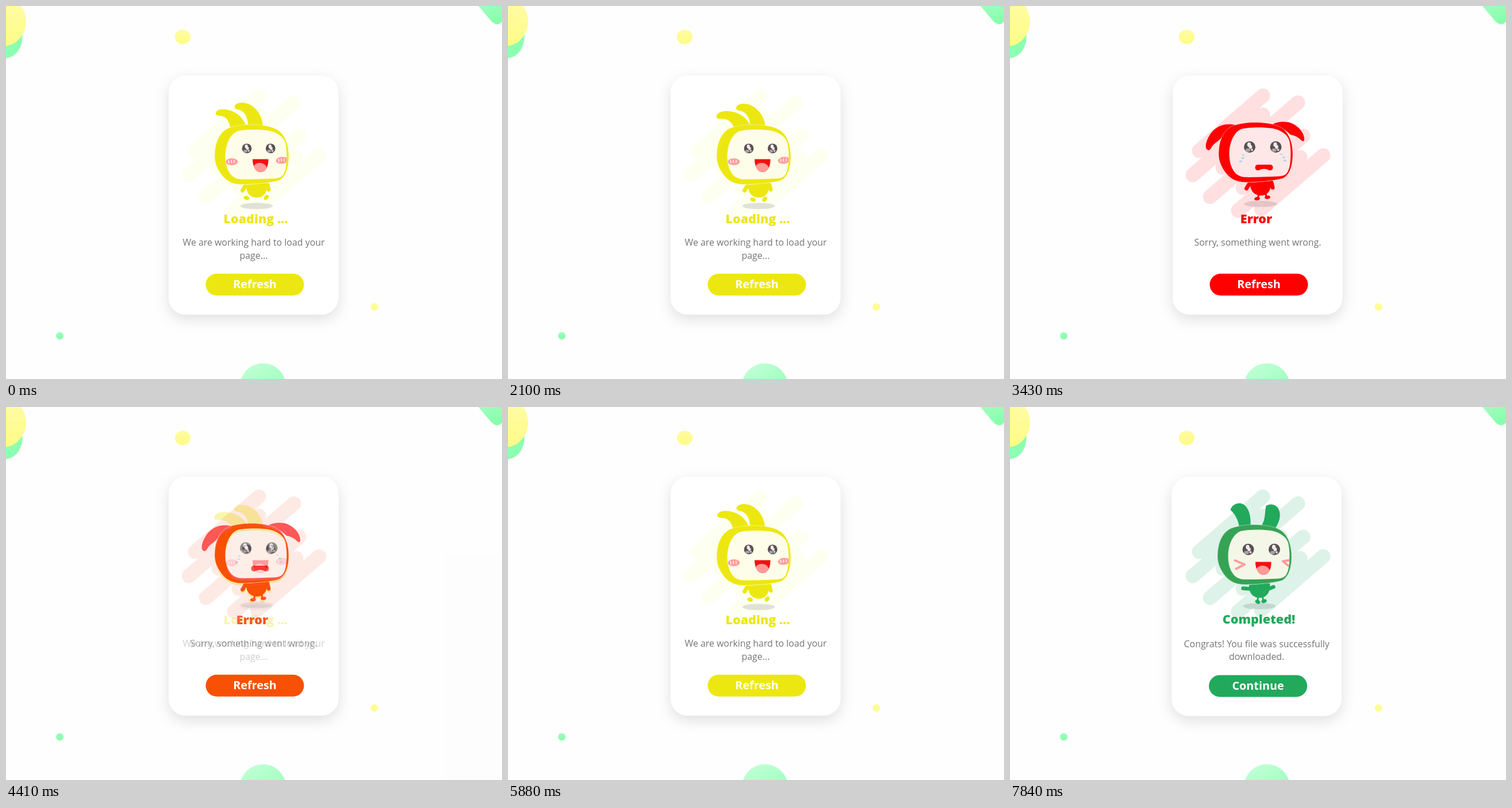
An HTML page for the animation above (9.03 s loop, 863 by 649 pixels).

```html
<!DOCTYPE html>
<html lang="en">
<head>
<meta charset="utf-8">
<title>Loading card</title>
<style>
  html, body { margin: 0; width: 100%; height: 100%; overflow: hidden; background: #fefefe; }
  svg { display: block; width: 863px; height: 649px; }
  text { font-family: "Open Sans", sans-serif; text-anchor: middle; }
  .title { font-size: 21.5px; font-weight: 800; }
  .note { font-size: 15.9px; fill: #757575; }
  .label { font-size: 19.8px; font-weight: 700; fill: #fff; }
  .limb { fill: none; stroke: currentColor; stroke-linecap: round; }
  .whisker { fill: none; stroke: #ff9c9c; stroke-width: 4; stroke-linecap: round; stroke-linejoin: round; }
</style>
</head>
<body>
<svg id="stage" viewBox="0 0 863 649">
  <defs>
    <linearGradient id="sun" x2="0" y2="1"><stop stop-color="#fffca2"/><stop offset="1" stop-color="#fffb86"/></linearGradient>
    <linearGradient id="mint" x2="0.6" y2="1"><stop stop-color="#a2fcc0"/><stop offset="1" stop-color="#86ffab"/></linearGradient>
    <linearGradient id="pale" x2="0.5" y2="1"><stop stop-color="#c8ffda"/><stop offset="1" stop-color="#8effb5"/></linearGradient>
    <filter id="soft" x="-20%" y="-20%" width="140%" height="140%">
      <feDropShadow dx="0" dy="8" stdDeviation="12" flood-color="#000" flood-opacity="0.12"/>
    </filter>
    <path id="head" d="M363 262C363 238 371 219 388 212C402 207 420 205.500 436 206.500C456 208 470 212 478 220C488 230 492 246 492 262C492 280 487 297 476 303C464 308 425 310.500 410 310.500C395 310 385 306 376 295C367 284 363 272 363 262Z"/>
    <path id="face" d="M381.500 262C381.500 242 389 224 402 218C412 214.500 440 214 456 216.500C470 219 483 227 486 238C489 250 489 268 487 280C485 292 481 299 470 300C455 300.500 425 302 408 301.500C390 300 382 283 381.500 262Z"/>
    <path id="mouth" d="M429 266.500H456.500C457 280 451 289 443 289C435 289 429 280 429 266.500Z"/>
    <clipPath id="inFace"><use href="#face"/></clipPath>
    <clipPath id="inMouth"><use href="#mouth"/></clipPath>
    <path id="torso" d="M418 311L454 308C456 322 449 333.500 437 333.500C424 333.500 417 324 418 311Z"/>
    <g id="eye">
      <circle r="10" fill="#575153"/>
      <ellipse cx="-1" cy="-4" rx="3.200" ry="4" fill="#f4e8ea"/>
      <ellipse cx="1.500" cy="0" rx="2.800" ry="3.300" fill="#f4e8ea"/>
      <ellipse cx="-3" cy="5.500" rx="4.200" ry="3" fill="#a9a2a4"/>
      <circle cx="4" cy="5" r="2" fill="#ddd5d7"/>
    </g>
    <g id="smile">
      <use href="#mouth" fill="#f31111"/>
      <ellipse cx="441.500" cy="284" rx="12.500" ry="11" fill="#ff9a98" clip-path="url(#inMouth)"/>
    </g>
    <path id="stripes" fill="none" stroke-width="25" stroke-linecap="round"
      d="M440 156L329 252M440 189L318 294M501 168L370 281M471 226L348 332M510 226L405 316M505 263L397 356M545 260L437 353"/>
    <g id="backdrop">
      <rect width="863" height="649" fill="#fefefe"/>
      <path d="M0 91C18 88 30 72 28.500 48L0 40Z" fill="#8cffb0"/>
      <path d="M0 69.500C19 68 35 48 35 27C35 16 31 6 26 0H0Z" fill="url(#sun)"/>
      <path d="M822 0L844 26Q855 37 863 27V0Z" fill="url(#mint)"/>
      <ellipse cx="307.500" cy="53.700" rx="13.500" ry="12.500" fill="url(#sun)"/>
      <circle cx="641" cy="523.500" r="6.500" fill="url(#sun)"/>
      <circle cx="93.500" cy="574" r="6.500" fill="url(#mint)"/>
      <circle cx="447" cy="661.500" r="40" fill="url(#pale)"/>
    </g>
  </defs>
</svg>
<script>
const LOOP = 9030;
const stage = document.getElementById('stage');

const ellipse = (x, y, rx, ry, turn = 0, fill = 'currentColor') =>
  `<ellipse rx="${rx}" ry="${ry}" fill="${fill}" transform="translate(${x} ${y}) rotate(${turn})"/>`;
const limb = (d, width) => `<path class="limb" d="${d}" stroke-width="${width}"/>`;
const eyes = (x1, x2, y, size) => [x1, x2].map(x =>
  `<use href="#eye" transform="translate(${x} ${y}) scale(${size})"/>`).join('');
const text = (kind, x, y, words) => `<text class="${kind}" x="${x}" y="${y}">${words}</text>`;

// A whole screen: dx, dy place the head and torso, cx, cy the card and its button.
function scene(o) {
  const at = `transform="translate(${o.dx} ${o.dy})"`;
  const [cx, cy] = o.card;
  const notes = o.notes.map((line, i) => text('note', 431 + cx, 417.3 + cy + i * 22.3, line)).join('');
  return `<g id="${o.id}" color="${o.color}">
    <use href="#backdrop"/>
    <rect x="${283 + cx}" y="${121 + cy}" width="295.500" height="416" rx="30" fill="#fff" filter="url(#soft)"/>
    <use href="#stripes" stroke="${o.stripes}"/>
    ${ellipse(436 + o.dx, 348 + o.dy, 28.5, 5.5, 0, 'rgba(0,0,0,.115)')}
    <g fill="currentColor">${o.ears}${o.limbs}<use href="#torso" ${at}/></g>
    <g ${at}>
      <use href="#head" fill="${o.headColor || o.color}" stroke="#fff" stroke-opacity=".6" stroke-width=".7"/>
      <use href="#face" fill="${o.faceColor}"/>
      <g clip-path="url(#inFace)">${o.cheeks || ''}</g>
    </g>
    ${o.features}
    <g fill="currentColor">${text('title', ...o.title)}</g>${notes}
    <rect x="${347.5 + o.button[0]}" y="${465.8 + o.button[1]}" width="171" height="38" rx="19" fill="currentColor"/>
    ${text('label', 433 + o.button[0], 491 + o.button[1], o.label)}
  </g>`;
}

const blush = (x, y, lean) => ellipse(x, y, 10.5, 6, lean, '#ff9f9f') +
  `<path d="M${x - 6} ${y - 2}l1 4m4 -4.500l.500 4m4.500 -4l0 4" fill="none" stroke="#fff" stroke-width="1.300" stroke-linecap="round"/>`;

const loading = scene({
  id: 'loading', color: '#ede711', faceColor: '#fdfde9', stripes: '#fdfff0',
  dx: 0, dy: 0, card: [0, 0], button: [0, 0],
  ears: '<path id="earL"/><path id="earR"/>',
  limbs: limb('M416 314L411.500 321', 7) + limb('M455 311L457 319.500', 7) +
    '<ellipse id="footL" rx="5" ry="3.500"/><ellipse id="footR" rx="5" ry="3.600"/>',
  cheeks: blush(393, 271, 0) + blush(480, 268.5, -6),
  features: eyes(419, 460.3, 247.8, .84) + '<use href="#smile"/>',
  title: [434.5, 377.5, 'Loading ...'],
  notes: ['We are working hard to load your', 'page...'], label: 'Refresh'
});

const tears = [[406, 259.5, 1.8], [405, 264.7, 2.6], [401, 270.3, 3], [472, 258, 1.8], [476.5, 263.3, 2.6], [478.5, 269, 2.8]]
  .map(([x, y, r]) => ellipse(x, y, r, 1.4, x < 440 ? -8 : 8, '#a3d5ec')).join('');

const error = scene({
  id: 'error', color: '#ff0000', faceColor: '#ffe7e8', stripes: '#ffdfe0',
  dx: 0, dy: -3.7, card: [0, 0], button: [0, 0],
  ears: `<path d="M392 207C375 203 359 208 349 222C341 234 339 245 342 249C345 252 348 251 350 247C354 239 362 236 367 230C374 220 380 212 392 207Z"/>
    <path d="M455 207C464 201 480 200 490 204C504 210 512 222 512 232C512 236 509 236 506 233C500 227 494 225 488 224C482 218 476 212 455 207Z"/>`,
  limbs: limb('M416 310L411.500 317.500', 7) + limb('M455 307L457 316', 7) +
    limb('M433 327L431.500 334M445 327L446 332', 3.2) + ellipse(430, 335.3, 5, 3, -8) + ellipse(448, 332.8, 5, 3, -8),
  features: eyes(417, 462.5, 245.2, 1) + tears +
    '<path d="M431 276H453C459 276 459 286 453 286C449 286 448 283.500 442 283.500C436 283.500 435 286 431 286C425 286 425 276 431 276Z" fill="#ff0000"/>',
  title: [428.5, 377.5, 'Error'], notes: ['Sorry, something went wrong.'], label: 'Refresh'
});

const done = scene({
  id: 'done', color: '#22a95c', headColor: '#36a354', faceColor: '#f4f7e7', stripes: '#ddf2e8',
  dx: -2, dy: -1.5, card: [-1.8, .6], button: [-1.4, .6],
  ears: `<path d="M399 209C397 196 392 187 383.500 179C386 171 393 167 400 167.500C411 168.500 420 182 418.500 207Z"/>
    <path d="M437 207C445 197 443 182 445.500 172C451 168 462 168.500 467 177C473 188 468 202 461 212Z"/>`,
  limbs: limb('M420 316.500L405.500 315.500', 6.5) + limb('M446 318L458.500 313', 6.5) +
    limb('M431.500 329L431 337M439 328L440.500 336', 3) + ellipse(431, 339, 4.6, 3.2, 25) + ellipse(442, 337.8, 4.8, 3.2, -15),
  cheeks: '<path class="whisker" d="M393.500 268.500L410 275.500L395.500 283M488 268L477 270L486 277.500"/>',
  features: eyes(414.5, 460, 247.7, 1) + '<use href="#smile" x="-2" y="3"/>',
  title: [433, 376.5, 'Completed!'],
  notes: ['Congrats! You file was successfully', 'downloaded.'], label: 'Continue'
});

stage.insertAdjacentHTML('beforeend', loading + error + done);
const part = id => document.getElementById(id);

// Attribute values of the moving parts: ears and feet up, then down.
const poses = [
  ['earL', 'd',
    'M390 211C388 200 384 194 377 192C370 190.500 364 191 365 186C367 180 373 179 381 180C396 181 411 191 417 207Z',
    'M393 211C390 203 384 198 377 197C370 196 362 198 362.500 192C364 185 374 182 384 183C398 184 414 191 421 207Z'],
  ['earR', 'd',
    'M421 207C421 194 415 184 407 181C401 180 397 179 398 174C400 168 412 167 421 170C436 176 446 192 447 209Z',
    'M421 207C421 195 415 186 407 183C401 182 396 181 397 176.500C400 169 412 169 421 172C436 178 446 193 448 209Z'],
  ['footL', 'transform', 'translate(418.500 334) rotate(15)', 'translate(426.500 337) rotate(20)'],
  ['footR', 'transform', 'translate(453 333) rotate(-52)', 'translate(446.500 336.200) rotate(-45)']
];

const NUMBER = /-?\d+(\.\d+)?/g;
function mix(from, to, k) {
  const ends = to.match(NUMBER);
  let i = 0;
  return from.replace(NUMBER, n => (+n + (ends[i++] - n) * k).toFixed(2));
}

const ease = (t, from, to) => {
  const k = Math.min(1, Math.max(0, (t - from) / (to - from)));
  return (1 - Math.cos(Math.PI * k)) / 2;
};

// Each neighbouring pair of times is one swing between the two poses.
const firstRun = [980, 1540, 1837, 2135, 2432, 2730];
const secondRun = [4970, 5320, 5670, 6020, 6370, 6720, 7070];
const swing = (t, times, start) => times.slice(1).reduce((pose, end, i) =>
  pose + (i % 2 === start ? 1 : -1) * ease(t, times[i], end), start);

function draw(now) {
  const t = now % LOOP;
  const pose = t < 3800 ? swing(t, firstRun, 0) : swing(t, secondRun, 1);
  for (const [id, name, up, down] of poses) part(id).setAttribute(name, mix(up, down, pose));
  part('error').setAttribute('opacity', ease(t, 3080, 3430) - ease(t, 4270, 4620));
  part('done').setAttribute('opacity', ease(t, 7490, 7840));
  requestAnimationFrame(draw);
}
draw(0);
</script>
</body>
</html>
```
